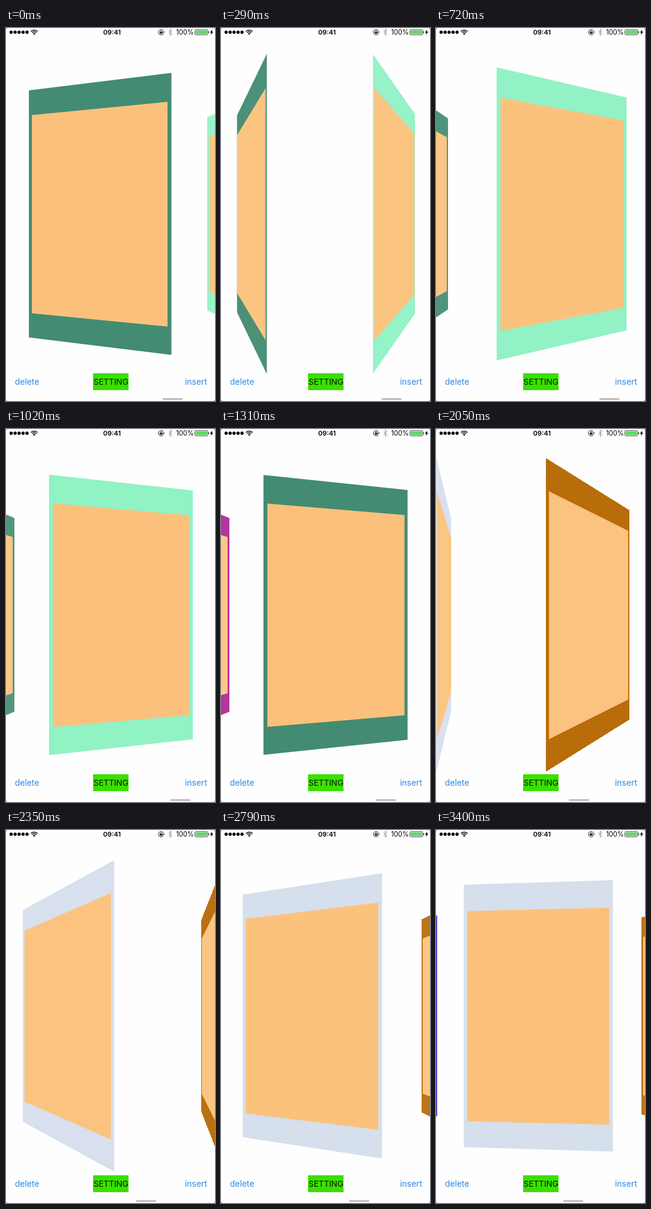
An HTML page that plays this animation: 348 by 619 pixels, repeating every 3500 ms.

```html
<!DOCTYPE html>
<html lang="en">
<head>
<meta charset="utf-8">
<title>Rotating card carousel</title>
<style>
  html, body { margin: 0; width: 100%; height: 100%; overflow: hidden; background: #000; }
  #stage { position: relative; width: 348px; height: 619px; overflow: hidden; background: #fefefe; border-radius: 2px; }
  .card { position: absolute; left: 49.7px; top: 86px; width: 250px; height: 445px; }
  .card::after { content: ""; position: absolute; inset: 44.5px 6.25px; background: #fbc17a; }
  svg { position: absolute; left: 0; top: 0; font-family: Inter, Roboto, sans-serif; }
</style>
</head>
<body>
<div id="stage">
  <svg id="chrome" width="348" height="619" viewBox="0 0 348 619">
    <!-- status bar -->
    <path d="M8.6 7h26.5" stroke="#000" stroke-width="5.4" stroke-linecap="round" stroke-dasharray="0 6.6"/>
    <g fill="none" stroke="#000" stroke-width="1.5">
      <path d="M41.4 5.7a8 8 0 0 1 11.2 0M43.4 7.8a5.1 5.1 0 0 1 7.2 0"/>
    </g>
    <path d="M45 9.3a2.8 2.8 0 0 1 4 0l-2 2.1z"/>
    <text x="176.5" y="11" font-size="11" font-weight="600" text-anchor="middle">09:41</text>
    <g fill="none" stroke="#222" stroke-width="1">
      <path d="M262.4 5.2a4.5 4.5 0 1 0 0 3.6"/>
      <path d="M257 6.6v-1a1.3 1.3 0 0 1 2.6 0v1"/>
    </g>
    <path d="M256 6.3h4.6v3.2h-4.6zM260.9 6h3.6l-1.8 2.3z" fill="#222"/>
    <path d="M270.5 4.2l6 5.4-3 2.7V1.6l3 2.7-6 5.4" fill="none" stroke="#999" stroke-width="1"/>
    <text x="283.2" y="11" font-size="11.2">100%</text>
    <rect x="314.5" y="2.7" width="21.6" height="8.6" rx="1.8" fill="none" stroke="#333" stroke-width=".9"/>
    <rect x="315.7" y="3.9" width="19.2" height="6.2" rx=".8" fill="#60d86a"/>
    <path d="M336.9 5.3q1.3 0 1.3 1.7t-1.3 1.7z" fill="#333"/>
    <path d="M343.6 2.4l-4 5.1h2.3l-1 4.1 4.3-5.3h-2.4z"/>
    <!-- buttons -->
    <rect x="145" y="573" width="59" height="28" fill="#3ae000"/>
    <text x="174.8" y="592" font-size="13.5" text-anchor="middle" fill="#0a1602">SETTING</text>
    <g font-size="13.9" fill="#2f88e2">
      <text x="14.8" y="592">delete</text>
      <text x="335" y="592" text-anchor="end">insert</text>
    </g>
    <rect id="bar" y="614.4" width="33.5" height="2.6" rx="1.3" fill="#b2b2b2"/>
  </svg>
</div>
<script>
  const LOOP = 3500, PAGE = 250.5;
  // The picture is refreshed only at these moments (ms)...
  const TICKS = [0, 140, 290, 430, 580, 720, 870, 1020, 1160, 1310, 1460, 1610,
    1760, 1900, 2050, 2200, 2350, 2500, 2650, 2790, 2940, 3090, 3240, 3400];
  // ...and each refresh advances the scrolling by a fixed time.
  const STEP = 150, TOUCH = 7 * STEP, RELEASE = 9 * STEP;
  const COLORS = ['#4830c0', '#d6dfec', '#b56700', '#ac2093', '#418a70', '#90f2c4'];

  const stage = document.getElementById('stage');
  const bar = document.getElementById('bar');
  const cards = COLORS.map(color => {
    const card = document.createElement('div');
    card.className = 'card';
    card.style.background = color;
    stage.insertBefore(card, document.getElementById('chrome'));
    return card;
  });

  // Scroll momentum loses 0.2% of its speed per millisecond.
  const decay = ms => 0.998 ** ms;

  // Scroll position in pages: glide right, flick back, glide left.
  function scrollAt(t) {
    if (t <= TOUCH) return 5.018 - 0.914 * decay(t);
    if (t < RELEASE) return 4.906 - 0.996 * ((t - TOUCH) / (RELEASE - TOUCH)) ** 2.7;
    return 0.983 + 2.927 * decay(t - RELEASE);
  }

  function draw(t) {
    const scroll = scrollAt(t);
    cards.forEach((card, i) => {
      const d = i - scroll;
      const scale = 1 - 0.174 * Math.abs(d);
      card.style.transform =
        `translateX(${d * PAGE}px) scale(${scale}) perspective(514px) rotateY(${d * 151.2}deg)`;
      card.style.opacity = 1 - 0.1 * Math.abs(d);
    });
    bar.setAttribute('x', 211.6 + 15.95 * (scroll - 1.026));
  }

  function frame() {
    const t = performance.now() % LOOP;
    draw(TICKS.findLastIndex(tick => tick <= t) * STEP);
    requestAnimationFrame(frame);
  }
  frame();
</script>
</body>
</html>
```
